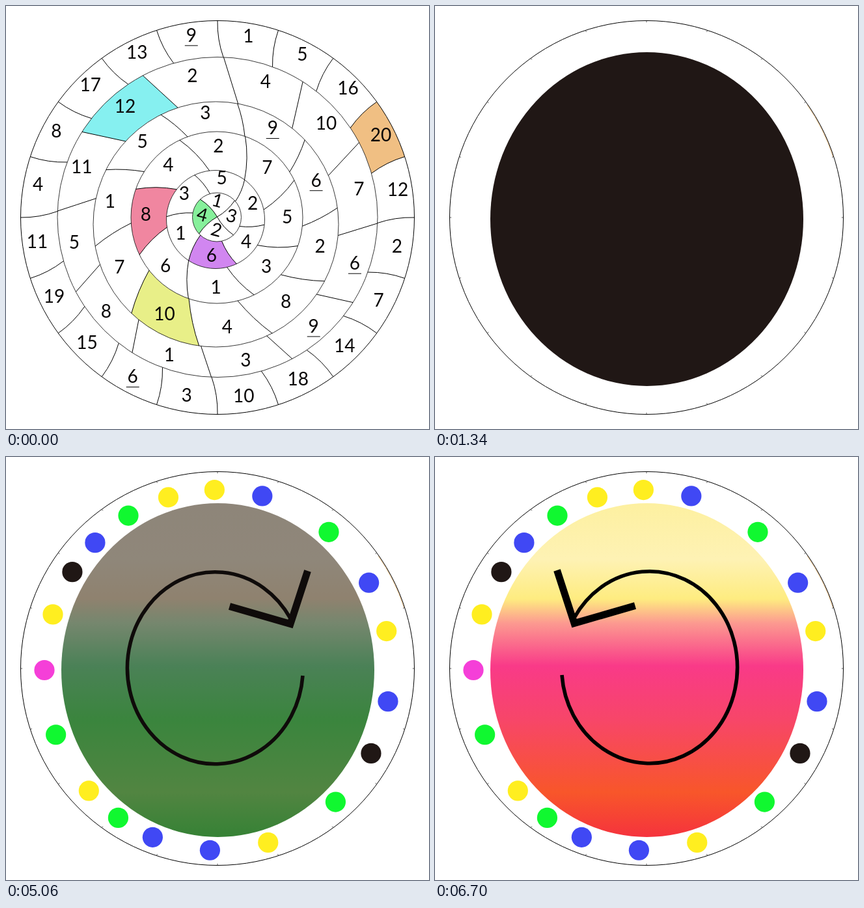
An HTML page for the animation above (7500 ms loop, 650x650 px).

```html
<!DOCTYPE html>
<html lang="en">
<head>
<meta charset="utf-8">
<title>Number wheel</title>
<style>
  html, body { margin: 0; width: 100%; height: 100%; overflow: hidden; background: #fff; }
  svg { display: block; width: 100vw; height: 100vh; }
  text { font: 28px Lato, "Open Sans", sans-serif; text-anchor: middle; fill: #0a0808; }
</style>
</head>
<body>
<svg id="stage" viewBox="0 0 650 650"></svg>
<script>
const INK = '#201715';
const FADE = 60, STEPS = 10, HOLD = 800, SCENE = 1340, LOOP = 7500;

// Boundaries from the rim to the hub: x, y, radius
const circles = [
  [325, 325, 302.5], [325, 324.5, 246], [322.5, 335.5, 188.5],
  [324, 325, 132], [322, 328, 75.5], [324, 324.5, 37.5], [324.5, 324, 0]
];

// Dividers run between evenly spaced angles; each end has a start, a sway and the sway's phase
const rings = [
  { nums: '1 5 16 20 12 2 7 14 18 10 3 6 15 19 11 4 8 17 13 9', from: [0], to: [2.1], bend: -0.09, tint: [3, '#f0bf83'] },
  { nums: '4 10 7 6 9 3 1 8 5 11 12 2', from: [2.2], to: [8.7, -3.9, 35], bend: 0, tint: [10, '#86f0f0'] },
  { nums: '9 6 2 8 4 10 7 1 5 3', from: [9, 1.5, -40], to: [19, 5, 19], bend: 0.06, tint: [5, '#e8ef88'] },
  { nums: '7 5 3 1 6 8 4 2', from: [19.3], to: [34.7, -3.4, 60], bend: 0.09, tint: [5, '#f086a0'] },
  { nums: '2 4 6 1 3 5', from: [34.7, 1.7, -27], to: [46, 6, 10], bend: 0.1, tint: [2, '#d186f0'] },
  { nums: '3 2 4 1', from: [47], to: [0], bend: 0.12, tint: [2, '#86f09b'], tilt: 15 }
].map(ring => ({ ...ring, nums: ring.nums.split(' ') }));

const dotAngles = [-1, 15, 40, 61, 77.5, 100, 117.5, 137, 163, 182.5, 202, 215, 228, 249, 270, 288, 303, 315, 329, 343.5];
const dotColors = { Y: '#ffee20', B: '#4048f4', G: '#10f830', K: INK, P: '#f53fd8' };
const dotOrder = 'YBGBYBKGYBBGYGPYKBGY';

const stops = [71, 157, 218, 255, 321, 405, 515, 584];
const meadow = ['#fbf3dd', '#fef6de', '#fdecc8', '#cbf6c6', '#76eb98', '#55f266', '#84f26e', '#4cec56'];
const sunset = ['#fdf0a0', '#fef2b4', '#feec80', '#fc9a90', '#f93a88', '#f74668', '#f8562a', '#f5333d'];

const rad = deg => deg * Math.PI / 180;
const polar = ([x, y, r], deg, ry = r) => [x + r * Math.sin(rad(deg)), y - ry * Math.cos(rad(deg))];

function ends(k, i) {
  const { nums, from, to } = rings[k];
  const angle = ([start, sway = 0, phase = 0]) => {
    const even = start + i * 360 / nums.length;
    return even + sway * Math.sin(rad(even - phase));
  };
  return [polar(circles[k], angle(from)), polar(circles[k + 1], angle(to))];
}

function divider(k, i) {
  const [p, q] = ends(k, i), { bend } = rings[k];
  const dx = q[0] - p[0], dy = q[1] - p[1];
  return { p, q, mid: [(p[0] + q[0]) / 2 + dy * bend, (p[1] + q[1]) / 2 - dx * bend] };
}

function cell(k) {
  const [i, color] = rings[k].tint;
  const a = divider(k, i), b = divider(k, i + 1);
  const r = circles[k][2], s = circles[k + 1][2];
  return `<path fill="${color}" d="M${a.p}A${r} ${r} 0 0 1 ${b.p}Q${b.mid} ${b.q}A${s} ${s} 0 0 0 ${a.q}Q${a.mid} ${a.p}Z"/>`;
}

// A number sits a little outside the middle of its cell; a lone 6 or 9 in the wide rings is underlined
function label(k, num, i) {
  const [p, q] = ends(k, i + 0.5);
  const x = p[0] * 0.6 + q[0] * 0.4, y = p[1] * 0.6 + q[1] * 0.4 - 3;
  const bar = k < 3 && /^[69]$/.test(num) ? `<path stroke="#000" d="M${x - 10} ${y + 16}h20"/>` : '';
  return `<text x="${x}" y="${y + 10}" transform="rotate(${rings[k].tilt || 0} ${x} ${y})">${num}</text>${bar}`;
}

const circle = ([x, y, r], style) => `<circle cx="${x}" cy="${y}" r="${r}" ${style}/>`;
const rim = circle(circles[0], 'fill="none" stroke="#000"');

function numberWheel() {
  const each = draw => rings.map((ring, k) => ring.nums.map((num, i) => draw(k, num, i)).join('')).join('');
  const lines = each((k, num, i) => {
    const { p, q, mid } = divider(k, i);
    return `M${p}Q${mid} ${q}`;
  });
  return rings.map((_, k) => cell(k)).join('') +
    circles.slice(1, 6).map(c => circle(c, 'fill="none" stroke="#222" stroke-width=".9"')).join('') +
    `<path d="${lines}" fill="none" stroke="#000"/>` + rim + each(label);
}

function disc(fill) {
  const edge = [325, 325, 301.5];
  const ticks = rings[0].nums.map((_, i) => `M${polar(edge, i * 18)}L${polar([325, 325, 300], i * 18)}`).join('');
  return `<path d="M${polar(edge, 55)}A301.5 301.5 0 0 1 ${polar(edge, 72)}" fill="none" stroke="#f0bf83"/>` +
    rim + `<path d="${ticks}" stroke="#222"/>` +
    `<ellipse cx="325.5" cy="327.5" rx="240.5" ry="256.5" fill="${fill}"/>`;
}

const dotRing = order => dotAngles.map((a, i) =>
  circle([...polar([325, 327.5, 266], a, 277), 15.6], `fill="${dotColors[order[i]]}"`)).join('');

function gradient(id, colors) {
  return `<linearGradient id="${id}" gradientUnits="userSpaceOnUse" x1="0" x2="0" y1="71" y2="584">` +
    colors.map((c, i) => `<stop offset="${(stops[i] - 71) / 513}" stop-color="${c}"/>`).join('') + '</linearGradient>';
}

function arrow(transform) {
  return `<g fill="none" stroke="#000" transform="${transform}">` +
    '<path stroke-width="5.6" d="M456 336A135 147.5 0 1 1 437 248"/>' +
    '<path stroke-width="11" d="M343.5 229.5L437 256.5L463.5 175"/></g>';
}

const scenes = [
  numberWheel(),
  disc(INK),
  disc(INK) + dotRing('Y'.repeat(20)),
  disc(INK) + dotRing(dotOrder),
  disc('url(#meadow)') + dotRing(dotOrder) + arrow(''),
  disc('url(#sunset)') + dotRing(dotOrder) + arrow('translate(651 -1) scale(-1 1)')
];

const stage = document.getElementById('stage');
stage.innerHTML = `<defs>${gradient('meadow', meadow)}${gradient('sunset', sunset)}</defs>` +
  scenes.map(s => `<g class="scene"><rect width="650" height="650" fill="#fff"/>${s}</g>`).join('');
const layers = [...stage.querySelectorAll('.scene')];

// Every scene is opaque, so it dissolves in over those beneath it
function draw(t) {
  layers.slice(1).forEach((layer, i) => {
    const begin = HOLD + SCENE * i;
    const step = Math.min(STEPS, Math.max(0, Math.floor((t - begin) / FADE) + 1));
    layer.style.opacity = step / STEPS;
    layer.style.display = step ? '' : 'none';
  });
}

const start = performance.now();
function tick() {
  draw((performance.now() - start) % LOOP);
  requestAnimationFrame(tick);
}
tick();
</script>
</body>
</html>
```
